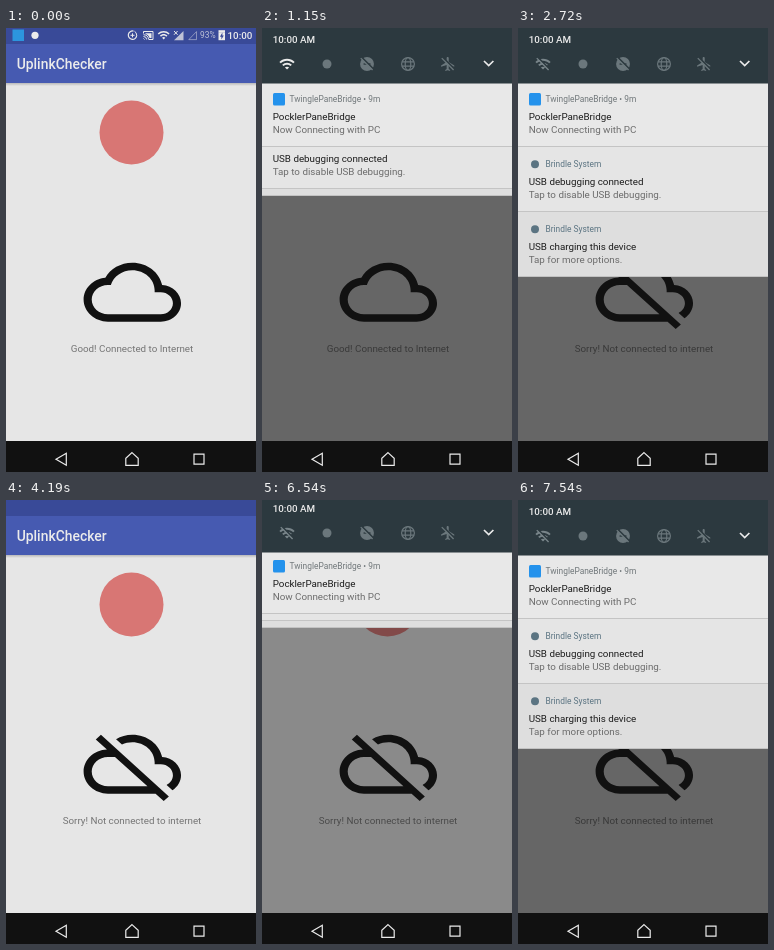
Animation, 250 px wide and 444 px high, one loop 8000 ms. Source, as an HTML page:

```html
<!DOCTYPE html>
<html lang="en">
<head>
<meta charset="utf-8">
<style>
  html, body { margin: 0; width: 100%; height: 100%; overflow: hidden; background: #111; }
  svg { display: block; width: 100vw; height: 100vh; font: 9.8px Roboto, sans-serif; }
  .medium { font-weight: 500; }
  .small { font-size: 8.4px; }
  .line { fill: none; stroke: currentColor; }
</style>
</head>
<body>
<svg viewBox="0 0 250 444">
  <defs>
    <path id="fan" d="M1 9l2 2c4.97-4.97 13.03-4.97 18 0l2-2C16.93 2.93 7.08 2.93 1 9zm8 8l3 3 3-3c-1.65-1.66-4.34-1.66-6 0zm-4-4l2 2c2.76-2.76 7.24-2.76 10 0l2-2C15.14 9.14 8.87 9.14 5 13z"/>
    <g id="slash">
      <path d="M4 2L21 19" stroke="#2c393f" stroke-width="2.6"/>
      <path d="M3 3.5L20 20.5" stroke="currentColor" stroke-width="2"/>
    </g>
    <linearGradient id="shade" x2="0" y2="1">
      <stop stop-opacity=".2"/><stop offset="1" stop-opacity="0"/>
    </linearGradient>
  </defs>

  <!-- app -->
  <rect width="250" height="414" fill="#e6e6e6"/>
  <rect y="55" width="250" height="3" fill="url(#shade)"/>
  <rect width="250" height="55" fill="#465ab1"/>
  <rect width="250" height="16" fill="#394a98"/>
  <text class="medium" x="10.7" y="41" font-size="13.9" fill="#ebebeb">UplinkChecker</text>
  <circle cx="125.5" cy="104.5" r="32" fill="#d87674"/>
  <path id="cloud" transform="translate(77.6 220.1) scale(4.06 3.68)" fill="#111"/>
  <text id="message" x="126" y="324.2" text-anchor="middle" fill="#757575"></text>

  <!-- status bar -->
  <g id="status" fill="#ebebeb" color="#ebebeb">
    <rect x="6.5" y="1.5" width="11.5" height="11.5" fill="#2c95de"/>
    <circle cx="29" cy="7.3" r="3.6"/>
    <g id="shifted">
      <path class="line" d="M127.5 3.1a4.2 4.2 0 1 0 3.2 4.2" stroke-width="1.2"/>
      <path class="line" d="M124.5 7.3h4M126.5 5.3v4M128.5 3.3q2 .9 2.2 4"/>
      <path class="line" d="M137.5 5.5V3.5h9.5v8h-4M137.5 10.5l1 1M137.5 8.5q3 0 3.2 3M137.5 6.7q5 .3 5 4.8"/>
      <path d="M139.5 5.2h6v4.8h-2q-1-3.4-4-4z"/>
    </g>
    <use id="statusFan" href="#fan" transform="translate(151.2 .6) scale(.54)"/>
    <path d="M168 12.2h9.5V3z" opacity=".75"/>
    <path d="M167.5 3l4.5 4.5m0-4.5l-4.5 4.5" stroke="#394a98" stroke-width="3"/>
    <path class="line" d="M168 3l3.6 3.8m0-3.8l-3.6 3.8"/>
    <path class="line" d="M182.8 11.6h7.7V3.6z" stroke-width=".9" opacity=".5"/>
    <text class="small" x="194" y="10.4" opacity=".75">93%</text>
    <rect id="tip" x="212.5" y="2.2" width="6.5" height="2"/>
    <path d="M212.5 4.2h6.5v8h-6.5z"/>
    <path d="M216.4 4.6l-2.5 4.2h1.5v2.8l2.4-4.2h-1.4z" fill="#394a98"/>
    <text class="medium" x="221.5" y="11">10:00</text>
  </g>

  <rect id="dim" width="250" height="414" fill="#111"/>

  <!-- notification panel, lowest card first -->
  <g id="panel">
    <g id="cards"></g>
    <g id="header" color="#6b777c" fill="#6b777c">
      <rect y="-60" width="250" height="115.5" fill="#2c393f"/>
      <text class="medium" x="10.7" y="15.2" fill="#ebebeb">10:00 AM</text>
      <circle id="ripple" cx="29" cy="33" fill="#fff" opacity=".1"/>
      <g id="wifi" color="#79858a" transform="translate(16.7 27.7) scale(.694)">
        <use href="#fan"/><use id="wifiSlash" href="#slash"/>
      </g>
      <circle cx="65" cy="36" r="4.5"/>
      <g transform="translate(96.7 27.7) scale(.694)">
        <circle cx="12" cy="12" r="10"/>
        <path d="M7 12h10" stroke="#2c393f" stroke-width="2"/>
        <use href="#slash"/>
      </g>
      <g class="line" transform="translate(146 36)" stroke-width="1.2">
        <circle r="6.4"/><ellipse rx="2.8" ry="6.4"/><path d="M-6 -2.2H6M-6 2.2H6"/>
      </g>
      <g transform="translate(177.7 27.7) scale(.694)">
        <path d="M21 16v-2l-8-5V3.5c0-.83-.67-1.5-1.5-1.5S10 2.67 10 3.5V9l-8 5v2l8-2.5V19l-2 1.5V22l3.5-1 3.5 1v-1.5L13 19v-5.5l8 2.5z"/>
        <use href="#slash"/>
      </g>
      <path d="M222 33l4.7 4.6 4.7-4.6" fill="none" stroke="#ebebeb" stroke-width="1.7"/>
    </g>
  </g>

  <!-- navigation bar -->
  <rect y="413" width="250" height="31" fill="#111"/>
  <g fill="none" stroke="#ebebeb" stroke-width="1.2">
    <path d="M60.3 425.3v12l-10.3-6z"/>
    <path d="M126 424.6l6.2 5.6v7.2h-12.4v-7.2z"/>
    <path d="M188 426.2h10v10h-10z"/>
  </g>
</svg>

<script>
const LOOP = 8000;
const $ = id => document.getElementById(id);
const set = (id, name, value) => $(id).setAttribute(name, value);
const show = (id, on) => set(id, "display", on ? "inline" : "none");

const CLOUD = "M19.35 10.04C18.67 6.59 15.64 4 12 4 9.11 4 6.6 5.64 5.35 8.04 2.34 8.36 0 10.91 0 14c0 3.31 2.69 6 6 6h13c2.76 0 5-2.24 5-5 0-2.64-2.05-4.78-4.65-4.96zM19 18H6c-2.21 0-4-1.79-4-4s1.79-4 4-4h.71C7.37 7.69 9.48 6 12 6c3.04 0 5.5 2.46 5.5 5.5v.5H19c1.66 0 3 1.34 3 3s-1.34 3-3 3z";
const CLOUD_OFF = "M19.35 10.04C18.67 6.59 15.64 4 12 4c-1.48 0-2.85.43-4.01 1.17l1.46 1.46C10.21 6.23 11.08 6 12 6c3.04 0 5.5 2.46 5.5 5.5v.5H19c1.66 0 3 1.34 3 3 0 1.13-.64 2.11-1.56 2.62l1.45 1.45C23.16 18.16 24 16.68 24 15c0-2.64-2.05-4.78-4.65-4.96zM3 5.27l2.75 2.74C2.56 8.15 0 10.77 0 14c0 3.31 2.69 6 6 6h11.73l2 2L21 20.73 4.27 4 3 5.27zM7.73 10l8 8H6c-2.21 0-4-1.79-4-4s1.79-4 4-4h1.73z";

// [time, panel bottom, backdrop opacity]
const PANEL = [
  [0, 0, 0], [690, 72, .2], [840, 126, .43], [990, 148, .52], [1150, 168, .6],
  [1300, 222, .6], [1430, 243, .6], [1580, 249, .6], [4190, 0, 0],
  [6410, 90, .27], [6540, 128, .43], [6690, 135, .43], [6840, 160, .6],
  [6990, 200, .6], [7120, 220, .6], [7270, 228, .6], [7410, 243, .6], [7540, 249, .6],
];
const STATUS = [[0, 1], [550, 0], [4340, .3], [4490, .8], [4650, .95], [5270, 1], [6410, 0]];
const RIPPLE = [[0, 0], [2320, 8], [2450, 11], [2600, 0]];
const at = (steps, t) => steps.findLast(s => s[0] <= t);

// Card contents are placed upwards from the bottom edge.
const BOTTOMS = [119, 184, 249];
const card = (i, fill, icon, name, nameFill, title, text) => `
  <g id="card${i}">
    <rect y="-65" width="250" height="65" fill="${fill}"/>
    <rect y="-.8" width="250" height=".8" fill="#bcbcbc"/>
    ${icon}
    <text class="small" x="27.5" y="-44.7" fill="${nameFill}">${name}</text>
    <text x="10.7" y="-27.5" fill="#1c1c1c">${title}</text>
    <text x="10.7" y="-13.6" fill="#6c6c6c">${text}</text>
  </g>`;
const dot = '<circle cx="17" cy="-47.7" r="4" fill="#5b7482"/>';
const square = '<rect x="11" y="-54" width="12" height="12.5" rx="1.5" fill="#2492ec"/>';
$("cards").innerHTML =
  card(2, "#dedede", dot, "Brindle System", "#5b7482", "USB charging this device", "Tap for more options.") +
  card(1, "#e5e5e5", dot, "Brindle System", "#5b7482", "USB debugging connected", "Tap to disable USB debugging.") +
  card(0, "#e8e8e8", square, "TwinglePaneBridge • 9m", "#70777a", "PocklerPaneBridge", "Now Connecting with PC");

function draw(t) {
  const [, bottom, dim] = at(PANEL, t);
  const online = t < 2720, wifiOn = t < 2600;

  set("cloud", "d", online ? CLOUD : CLOUD_OFF);
  $("message").textContent = online ? "Good! Connected to Internet" : "Sorry! Not connected to internet";

  set("status", "opacity", at(STATUS, t)[1]);
  set("shifted", "transform", `translate(${wifiOn ? 0 : 14.7})`);
  show("statusFan", wifiOn);
  set("tip", "opacity", t >= 150 && t < 6260 ? .45 : 1);

  set("dim", "opacity", dim);
  show("panel", bottom > 0);
  // Collapsed cards stack as 7px strips below the first one.
  BOTTOMS.forEach((full, i) =>
    set("card" + i, "transform", `translate(0 ${Math.min(full, bottom - 7 * (2 - i))})`));
  set("header", "transform", `translate(0 ${.6 * Math.min(0, bottom - 133)})`);

  set("ripple", "r", at(RIPPLE, t)[1]);
  set("wifi", "fill", wifiOn ? "#ebebeb" : "#79858a");
  show("wifiSlash", !wifiOn);
}

const start = performance.now();
function frame() {
  draw((performance.now() - start) % LOOP);
  requestAnimationFrame(frame);
}
frame();
</script>
</body>
</html>
```
